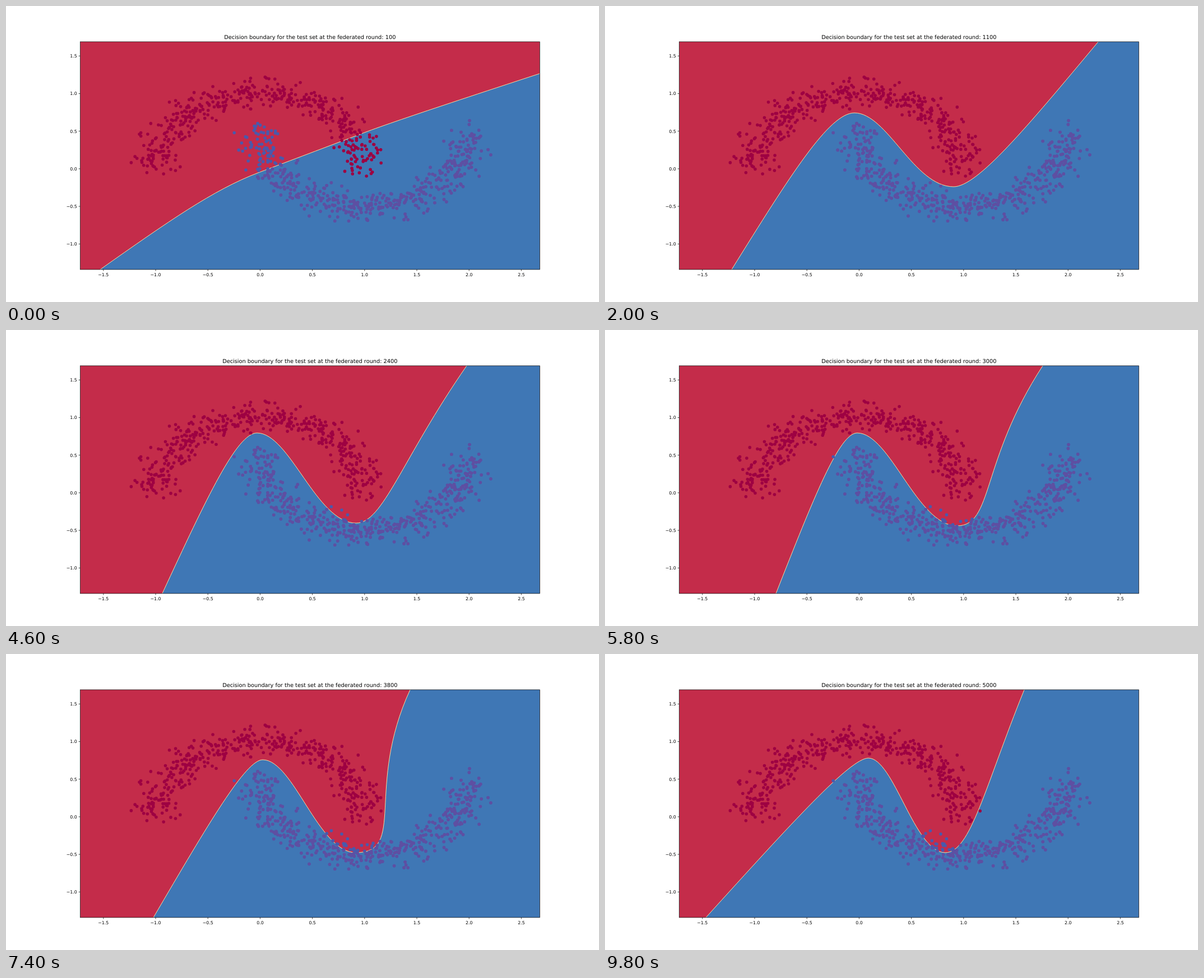
Write an HTML page with a canvas that moves like this. It is 1058 px wide and 529 px high and loops after 10000 ms.

```html
<!DOCTYPE html>
<html lang="en">
<head>
<meta charset="utf-8">
<title>Decision boundary</title>
<style>
  html, body { margin: 0; width: 100%; height: 100%; overflow: hidden; background: #fff; }
  canvas { display: block; width: 1058px; height: 529px; }
</style>
</head>
<body>
<canvas id="plot" width="1058" height="529"></canvas>
<script>
const ctx = document.getElementById('plot').getContext('2d');
const STEP = 200, STEPS = 50;
const LEFT = 132.3, TOP = 63.9, RIGHT = 952.3, BOTTOM = 470.9;
const toX = v => 453.4 + v * 186.4;
const toY = v => 290.9 - v * 134.4;
const RED = '#c42c4a', BLUE = '#3f77b5', EDGE = '#f3d9a0';
const DARK = '#9e0142', PURPLE = '#5e4fa2', INDIGO = '#4a59ab';
const DOT = 2.8;

// The boundary enters at x = from on the bottom edge, turns at a crest and
// a dip, and leaves at x = to on the top edge. left and right are the widths
// of the outer turns, tilt slopes both turns, bend curves the last stretch.
const POSES = [
  { at: 0, from: 168, crest: [450, 298], dip: [640, 226], to: 1126, left: 80, right: 60, tilt: 0.38 },
  { at: 6, from: 161, crest: [460, 242], dip: [600, 269], to: 914, left: 56, right: 58 },
  { at: 10, from: 226, crest: [445, 191], dip: [622, 323], to: 880, left: 45, right: 42 },
  { at: 18, from: 257, crest: [446, 184], dip: [622, 341], to: 856, left: 39, right: 33 },
  { at: 29, from: 305, crest: [450, 184], dip: [628, 350], to: 781, left: 32, right: 65, bend: -59 },
  { at: 37, from: 263, crest: [458, 189], dip: [624, 355], to: 721, left: 30, right: 91, bend: -77 },
  { at: 49, from: 180, crest: [470, 186], dip: [607, 355], to: 748, left: 32, right: 45, bend: -13 }
];

function random(seed) {
  return () => {
    seed = (seed + 0x6d2b79f5) | 0;
    let v = Math.imul(seed ^ (seed >>> 15), 1 | seed);
    v = (v + Math.imul(v ^ (v >>> 7), 61 | v)) ^ v;
    return ((v ^ (v >>> 14)) >>> 0) / 4294967296;
  };
}

// Half circle of dots with Gaussian noise
function moon(cx, cy, side, seed) {
  const rnd = random(seed), path = new Path2D(), count = 500;
  for (let i = 0; i < count; i++) {
    const a = Math.PI * i / (count - 1);
    const r = Math.min(0.25, 0.1 * Math.sqrt(-2 * Math.log(1 - rnd())));
    const b = 2 * Math.PI * rnd();
    const x = toX(cx + side * Math.cos(a) + r * Math.cos(b));
    const y = toY(cy + side * Math.sin(a) + r * Math.sin(b));
    path.moveTo(x + DOT, y);
    path.arc(x, y, DOT, 0, 7);
  }
  return path;
}
const upper = moon(0, 0, 1, 11), lower = moon(1, 0.5, -1, 29);

const mix = (a, b, k) => a + (b - a) * k;
const mixPoint = (p, q, k) => [mix(p[0], q[0], k), mix(p[1], q[1], k)];

function poseAt(step) {
  const i = Math.max(1, POSES.findIndex(p => p.at >= step));
  const a = POSES[i - 1], b = POSES[i], k = (step - a.at) / (b.at - a.at);
  const num = key => mix(a[key] || 0, b[key] || 0, k);
  return {
    start: [num('from'), BOTTOM], end: [num('to'), TOP],
    crest: mixPoint(a.crest, b.crest, k), dip: mixPoint(a.dip, b.dip, k),
    left: num('left'), right: num('right'), tilt: num('tilt'), bend: num('bend')
  };
}

function boundary(step) {
  const { start, crest, dip, end, left, right, tilt, bend } = poseAt(step);
  const path = new Path2D(), gap = dip[0] - crest[0];
  const along = (p, dx) => [p[0] + dx, p[1] - tilt * dx];
  const curve = (a, b, c) => path.bezierCurveTo(...a, ...b, ...c);
  const entry = along(crest, -left), exit = along(dip, right);
  const last = mixPoint(end, exit, 0.6);
  last[0] += bend;
  path.moveTo(...start);
  curve(mixPoint(start, entry, 0.6), entry, crest);
  curve(along(crest, gap * 0.33), along(dip, -gap * 0.4), dip);
  curve(exit, last, end);
  return path;
}

function text(str, x, y, size, align) {
  ctx.font = `${size}px "DejaVu Sans", sans-serif`;
  ctx.textAlign = align;
  ctx.fillText(str, x, y);
}

function axes(step) {
  ctx.strokeStyle = ctx.fillStyle = '#000';
  ctx.lineWidth = 0.7;
  ctx.strokeRect(LEFT, TOP, RIGHT - LEFT, BOTTOM - TOP);
  const label = v => v.toFixed(1).replace('-', '\u2212');
  ctx.beginPath();
  for (let v = -1.5; v <= 2.5; v += 0.5) {
    ctx.moveTo(toX(v), BOTTOM);
    ctx.lineTo(toX(v), BOTTOM + 2.7);
    text(label(v), toX(v), 483, 7.8, 'center');
  }
  for (let v = -1; v <= 1.5; v += 0.5) {
    ctx.moveTo(LEFT, toY(v));
    ctx.lineTo(LEFT - 2.7, toY(v));
    text(label(v), LEFT - 5.6, toY(v) + 2.9, 7.8, 'right');
  }
  ctx.stroke();
  text('Decision boundary for the test set at the federated round: ' + 100 * (step + 1),
    (LEFT + RIGHT) / 2, 58.8, 9.78, 'center');
}

function fill(colour, path) {
  ctx.fillStyle = colour;
  ctx.fill(path);
}

function draw(step) {
  ctx.fillStyle = '#fff';
  ctx.fillRect(0, 0, 1058, 529);

  const frame = new Path2D();
  frame.rect(LEFT, TOP, RIGHT - LEFT, BOTTOM - TOP);
  const line = boundary(step);
  const area = new Path2D(line);
  area.lineTo(1200, TOP);
  area.lineTo(1200, BOTTOM);
  area.closePath();

  ctx.save();
  ctx.clip(frame);
  fill(RED, frame);
  fill(BLUE, area);
  ctx.strokeStyle = EDGE;
  ctx.lineWidth = 1;
  ctx.stroke(line);
  fill(INDIGO, lower);
  ctx.save();
  ctx.clip(area);
  fill(PURPLE, lower);
  ctx.restore();
  fill(DARK, upper);
  ctx.restore();

  axes(step);
}

ctx.textRendering = 'geometricPrecision';
const began = performance.now();
let shown = -1;
function tick() {
  const step = Math.floor((performance.now() - began) / STEP) % STEPS;
  if (step !== shown) draw(shown = step);
  requestAnimationFrame(tick);
}
tick();
</script>
</body>
</html>
```
